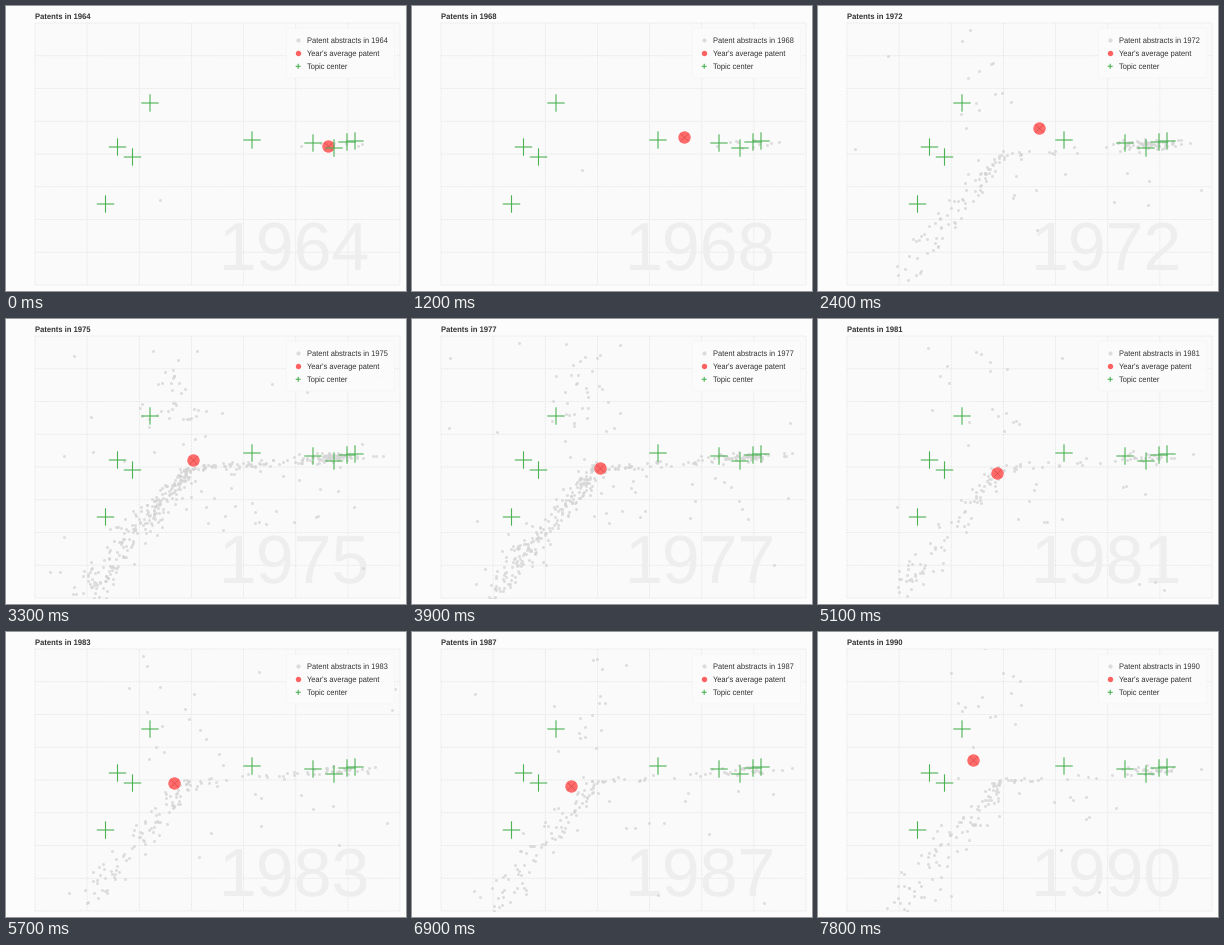
Write a matplotlib script that moves like this. It is 400 px wide and 285 px high and loops after 8000 ms.

```python
import numpy as np
import matplotlib.pyplot as plt
from matplotlib.animation import FuncAnimation
from matplotlib.patches import FancyBboxPatch, Rectangle

W, H, DPI = 400, 285, 100
PT = 72 / DPI
FIRST_YEAR, FRAMES_PER_YEAR = 1964, 3
LEFT, TOP, RIGHT, BOTTOM = 29, 17, 394, 279
GREEN, RED, GREY = "#4bb354", "#ff6060", "#d4d4d4"

plt.rcParams.update({"font.family": "Liberation Sans", "text.hinting": "none"})

# Year, x, y of the average patent; it moves linearly between these
MEAN_PATH = np.array([
    (1964, 322, 140.3), (1972, 221, 121.5), (1975, 187, 141), (1979, 189.7, 156.7),
    (1983, 168, 151.3), (1987, 158.7, 154.3), (1990, 154.5, 128.3)])

# Center line of the diagonal arm
ARM_PATH = np.array([(82, 276), (100, 248), (125, 218), (150, 192), (168, 168), (182, 151)])

TOPICS = [(144, 97), (111.5, 141), (126.5, 151), (99.5, 198), (246, 134),
          (307, 137), (328, 142), (341, 136), (349, 135)]


def logistic(x):
    return 1 / (1 + np.exp(-x))


def abstracts(year):
    """Positions of all abstracts of one year."""
    rng = np.random.default_rng(year)
    started = logistic(1.2 * (year - 1971))
    total = 8 + 170 * started + 290 * np.exp(-((year - 1975.5) / 2.8) ** 2)
    cluster_share = 0.12 + 0.75 * logistic(1971 - year)
    n_cluster = round(total * cluster_share)
    rest = total - n_cluster

    def count(share):
        return round(rest * share)

    n = count(0.58)
    t = rng.random(n)
    steps = np.linspace(0, 1, len(ARM_PATH))
    arm = np.c_[np.interp(t, steps, ARM_PATH[:, 0]), np.interp(t, steps, ARM_PATH[:, 1])]
    arm += rng.normal(size=(n, 2)) * (9 - 6.5 * t**2)[:, None]

    n = count(0.2)
    x = 180 + 205 * rng.random(n) ** 1.7
    ridge = np.c_[x, 150 - 0.07 * (x - 180) + rng.normal(0, 2, n)]

    cluster = rng.normal((328, 138), (15, 2.2), (n_cluster, 2))
    upper = rng.normal((165, 80), (22, 32), (count(0.1), 2))
    lower = rng.uniform((175, 150), (340, 205), (count(0.06), 2))
    wide = rng.uniform((35, 22), (390, 272), (count(0.06), 2))
    return np.vstack([arm, ridge, cluster, upper, lower, wide])


fig = plt.figure(figsize=(W / DPI, H / DPI), dpi=DPI, facecolor="#fcfcfc")
ax = fig.add_axes([0, 0, 1, 1])
ax.set(xlim=(0, W), ylim=(H, 0))
ax.axis("off")


def label(x, y, px, text="", color="#333333", **kw):
    return ax.text(x, y, text, fontsize=px * PT, color=color, va="baseline", **kw)


def cross(x, y, size, z):
    style = dict(color=GREEN, lw=1.1 * PT, zorder=z, snap=False,
                 solid_capstyle="butt")
    ax.plot([x - size, x + size], [y, y], **style)
    ax.plot([x, x], [y - size, y + size], **style)


# Plot area and grid
area = Rectangle((LEFT, TOP), RIGHT - LEFT, BOTTOM - TOP, fc="#fafafa", ec="none", zorder=0)
ax.add_patch(area)
grid = dict(color="#e8e8e8", lw=0.8 * PT, linestyle=(0, (2.5, 1)), zorder=0.5, snap=False)
ax.vlines(np.linspace(LEFT, RIGHT, 8), TOP, BOTTOM, **grid)
ax.hlines(np.linspace(TOP, BOTTOM, 9), LEFT, RIGHT, **grid)

# Data layers
big_year = label(212.5, 264, 68, color="#eeeeee", zorder=1)
dots = ax.scatter([], [], s=(3 * PT) ** 2, c=GREY, alpha=0.75, lw=0, zorder=2)
dots.set_clip_path(area)
mean_dot, = ax.plot([], [], "o", ms=12.4 * PT, color=RED, mew=0,
                    alpha=0.92, zorder=4, snap=False)
mean_x, = ax.plot([], [], "x", ms=8 * PT, color="#dd4a4a", mew=0.6 * PT,
                  zorder=4.5, snap=False)
for x, y in TOPICS:
    cross(x, y, 8.7, 5)

# Title and legend
title = label(29, 12.7, 7.6, weight="bold")
ax.add_patch(FancyBboxPatch((282.5, 24), 104, 46, boxstyle="round,pad=2",
                            fc="#fcfcfc", ec="#f3f3f3", lw=0.6 * PT,
                            alpha=0.9, zorder=6))
for y, size, color in [(34, 4.2, "#dcdcdc"), (47.2, 5.4, RED)]:
    ax.plot(292.2, y, "o", ms=size * PT, color=color, mew=0, zorder=7, snap=False)
cross(292.2, 60.3, 2.5, 7)
legend_year = label(301, 36.6, 7.55, zorder=7)
label(301, 49.9, 7.55, "Year's average patent", zorder=7)
label(301, 63.1, 7.55, "Topic center", zorder=7)


def update(frame):
    year = FIRST_YEAR + frame // FRAMES_PER_YEAR
    title.set_text(f"Patents in {year}")
    legend_year.set_text(f"Patent abstracts in {year}")
    big_year.set_text(str(year))
    dots.set_offsets(abstracts(year))
    years, xs, ys = MEAN_PATH.T
    for marker in (mean_dot, mean_x):
        marker.set_data([np.interp(year, years, xs)], [np.interp(year, years, ys)])
    return title, legend_year, big_year, dots, mean_dot, mean_x


anim = FuncAnimation(fig, update, frames=80, interval=100, repeat=True,
                     repeat_delay=0, blit=False)
plt.show()
```
